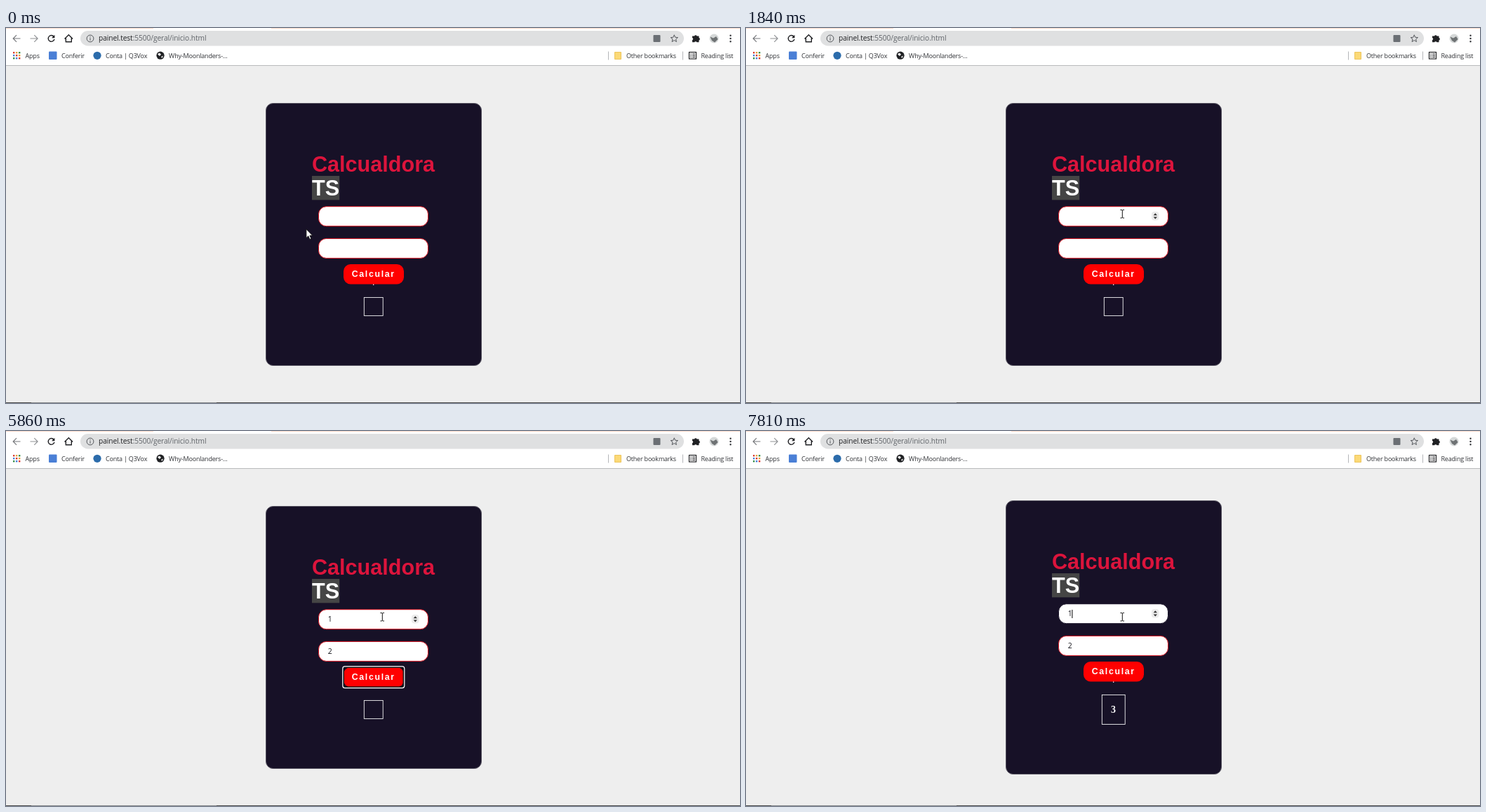
Animation, 1046 px wide and 535 px high, one loop 8 s. Source, as an HTML page:

```html
<!DOCTYPE html>
<html lang="pt">
<head>
<meta charset="utf-8">
<title>Calculadora</title>
<style>
  html, body { margin: 0; width: 100%; height: 100%; overflow: hidden; background: #eee; }
  svg { display: block; width: 1046px; height: 535px; }
  text { white-space: pre; }
  .ui { font-family: "Open Sans", "Noto Sans", sans-serif; fill: #303236; }
  .mark { font-size: 9px; letter-spacing: -.2px; }
  .url { font-size: 10.2px; letter-spacing: -.08px; fill: #5f6368; }
  .field { font-size: 10.4px; fill: #111118; }
  .title { font: bold 30.6px "Liberation Sans", Arial, sans-serif; }
  .calc { font: bold 12.3px "Liberation Sans", Arial, sans-serif; letter-spacing: 1.7px; fill: #fff; }
  .sum { font: bold 14px "Liberation Serif", "Times New Roman", serif; fill: #fff; text-anchor: middle; }
  .line { fill: none; stroke: #202124; stroke-width: 1.4; }
  .thin { stroke: #55585c; stroke-width: 1; }
  .box { fill: #fff; stroke: #d8101c; }
  .box.focus { stroke: #171127; }
</style>
</head>
<body>
<svg viewBox="0 0 1046 535">
  <rect width="1046" height="535" fill="#eee"/>

  <!-- toolbar -->
  <rect width="1046" height="53" fill="#fff"/>
  <path d="M0 .5H210M378 .5H1046" stroke="#fbdccb"/>
  <rect y="53" width="1046" height="1" fill="#b9babb"/>
  <rect x="106" y="4" width="860" height="21.5" rx="10.7" fill="#dfe0e1"/>
  <path class="line" d="M20.5 15H10.5M15 10.2L10.2 15L15 19.8" style="stroke:#77797c;stroke-width:1.2"/>
  <path class="line" d="M34.5 15H45M40.3 10.2L45.1 15L40.3 19.8" style="stroke:#8f9194;stroke-width:1.2"/>
  <path class="line" d="M68.2 12.4A4.4 4.4 0 1 0 68.9 16"/>
  <path d="M69.4 9.8V14.2H65Z" fill="#202124"/>
  <path class="line" d="M83.5 15.4L89.3 9.8L95.1 15.4M85.3 14.2V19.8H93.3V14.2"/>
  <circle class="line thin" cx="120" cy="15" r="4.9"/>
  <path class="line thin" d="M120 14.2V17.8M120 12V13.2"/>
  <text class="ui url" x="132" y="18.4"><tspan fill="#202124">painel.test</tspan>:5500/geral/inicio.html</text>
  <rect x="922.5" y="10" width="10" height="10" rx="1" fill="#6b6f74"/>
  <path class="line thin" id="star"/>
  <path d="M978 11.5H981A1.9 1.9 0 0 1 984.6 11.5H987.5V14A1.8 1.8 0 0 1 987.5 17.5V20.3H984.4A1.7 1.7 0 0 0 981.2 20.3H978V17.3A1.8 1.8 0 0 0 978 13.9Z" fill="#202124"/>
  <circle cx="1009" cy="15" r="6.5" fill="#d5d8d8"/>
  <path d="M1003.5 12.5L1008 14.5L1012 12L1014.5 16L1010 20.5L1006 18Z" fill="#6e7274"/>
  <path d="M1032.5 10.8V19.3" stroke="#303236" stroke-width="2.4" stroke-linecap="round" stroke-dasharray="0 4.2"/>

  <!-- bookmarks -->
  <g id="apps"></g>
  <text class="ui mark" x="27.5" y="42.6">Apps</text>
  <rect x="61" y="33.5" width="11.5" height="11.5" rx="1" fill="#4a7fd6"/>
  <text class="ui mark" x="79" y="42.6">Conferir</text>
  <circle cx="130" cy="39.3" r="5.6" fill="#2c6cab"/>
  <text class="ui mark" x="142" y="42.6">Conta | Q3Vox</text>
  <circle cx="220" cy="39.2" r="5.6" fill="#202124"/>
  <path d="M216 37L219 35.5L221 38L218.5 40ZM221 41L224 39.5L222.5 43Z" fill="#fff"/>
  <text class="ui mark" x="232" y="42.6">Why-Moonlanders-...</text>
  <path d="M858.5 33.5V45.5M964.5 33.5V45.5" stroke="#b4b6b9"/>
  <path d="M867.5 34.5H876.5V44.5H867.5Z" fill="#fbd977" stroke="#edc55e"/>
  <text class="ui mark" x="884" y="42.6">Other bookmarks</text>
  <rect class="line" x="973.5" y="34.5" width="10" height="9.5" style="stroke-width:1.2"/>
  <path class="line" d="M975.3 37H977M978 37H982M975.3 39.3H977M978 39.3H982M975.3 41.6H977M978 41.6H982" style="stroke-width:1"/>
  <text class="ui mark" x="990.5" y="42.6">Reading list</text>

  <!-- calculator -->
  <rect id="card" x="370.5" width="307" rx="10" fill="#171127" stroke="#55525f"/>
  <g id="form">
    <text class="title" x="436" y="205" fill="#dc143c">Calcualdora</text>
    <rect x="436" y="211" width="39.2" height="34.3" fill="#454545"/>
    <text class="title" x="436" y="239" fill="#fff">TS</text>

    <rect class="box" id="boxA" x="445.5" y="254.7" width="156" height="28" rx="11"/>
    <rect class="box" id="boxB" x="445.5" y="300.4" width="156" height="28" rx="11"/>
    <text class="ui field" id="textA" x="458.8" y="272.2"></text>
    <text class="ui field" id="textB" x="458.8" y="317.7"></text>
    <rect id="caret" width="1" height="12"/>
    <g id="spin">
      <rect x="578" y="262" width="10.5" height="12.5" rx="4" fill="#ececec"/>
      <path d="M580.6 267.2L583.3 264.2L586 267.2ZM580.6 269.4L583.3 272.4L586 269.4Z" fill="#333"/>
    </g>

    <rect x="523" y="365" width="1.3" height="2" fill="#e8e8ee"/>
    <rect x="481" y="337" width="86" height="28.5" rx="10" fill="#f00"/>
    <g id="ring" fill="none">
      <rect x="481.2" y="337.3" width="85.2" height="28" rx="4" stroke="#101010" stroke-width="1.6"/>
      <rect x="479.8" y="335.9" width="88" height="30.7" rx="3" stroke="#fff" stroke-width="1.2"/>
    </g>
    <text class="calc" x="492.7" y="355">Calcular</text>
  </g>
  <rect id="sumBox" fill="none" stroke="#fff" stroke-width=".85"/>
  <text class="sum" id="sum" x="523.5" y="402.2"></text>

  <!-- window edge -->
  <rect y="534" width="1046" height="1" fill="#4c4c4c"/>
  <rect x="36" y="534" width="264" height="1" fill="#85878a"/>

  <!-- pointer -->
  <g id="pointer">
    <circle id="click" cx="-1.5" cy="-.5" r="9.5" fill="#ff0" fill-opacity=".47"/>
    <path id="arrow" d="M.4 .5V13L3.3 10.3L5.4 15L7.5 14.1L5.4 9.6H9.2Z" fill="#fff" stroke="#111" stroke-width=".9"/>
    <path id="beam" d="M-2.5 -5.5H-.8L.3 -5L1.4 -5.5H3M.3 -5V5.5M-2.5 6H-.8L.3 5.5L1.4 6H3" fill="none" stroke="#111"/>
  </g>
</svg>

<script>
const LOOP = 8000, BLINK = 500, CLICK = 240, GAP = 67;
const el = id => document.getElementById(id);
const set = (id, attrs) => {
  for (const k in attrs) el(id).setAttribute(k, attrs[k]);
};
const show = (id, on) => set(id, { visibility: on ? 'visible' : 'hidden' });

// What the user does; each action keeps the rest of the state.
const actions = [
  { t: 0, A: '', B: '', sum: '', focus: '' },
  { t: 2040, focus: 'A', click: true },
  { t: 3050, A: '1' },
  { t: 3510, focus: 'B' },
  { t: 4190, B: '1' },
  { t: 5250, B: '' },
  { t: 5450, B: '2' },
  { t: 5860, focus: 'button' },
  { t: 6390, sum: '3' },
  { t: 7530, focus: 'A', click: true }
];

// Pointer glides: cubic curves walked in equal hops.
const home = [427.5, 286.5], left = [252, 302], top1 = [268, 240], gap = [562, 300], rest = [536, 265];
const glides = [
  { t: 70, hops: 1, path: [home, home, left, left] },
  { t: 480, hops: 8, path: [left, [21, 390], [21, 240], top1] },
  { t: 1030, hops: 4, path: [top1, [350, 235], [520, 262], gap] },
  { t: 1570, hops: 5, path: [gap, [556, 280], [541, 268], rest] }
];

const bezier = ([a, b, c, d], u) => a.map((_, i) => {
  const v = 1 - u;
  return v * v * v * a[i] + 3 * v * v * u * b[i] + 3 * v * u * u * c[i] + u * u * u * d[i];
});

function pointerAt(t) {
  const g = glides.filter(g => g.t <= t).pop();
  if (!g) return home;
  const hop = Math.min(g.hops, 1 + Math.floor((t - g.t) / GAP));
  return bezier(g.path, hop / g.hops);
}

function draw(t) {
  const past = actions.filter(a => a.t <= t);
  const last = past[past.length - 1];
  const s = Object.assign({}, ...past);
  const age = t - last.t;

  const [x, y] = pointerAt(t);
  const over = x > 446 && x < 601 && y > 255 && y < 282;
  set('pointer', { transform: `translate(${x} ${y})` });
  show('arrow', !over);
  show('beam', over);
  show('spin', over);
  show('click', last.click && age < CLICK);
  show('ring', s.focus === 'button');

  for (const f of ['A', 'B']) {
    el('box' + f).classList.toggle('focus', s.focus === f);
    el('text' + f).textContent = s[f];
  }
  show('caret', s.focus in { A: 1, B: 1 } && Math.floor(age / BLINK) % 2 === 0);
  set('caret', { x: s[s.focus] ? 464.4 : 459, y: s.focus === 'B' ? 308.5 : 263 });

  // The answer makes the card grow by 8 px both ways.
  const grow = s.sum ? 8 : 0, wide = s.sum ? 3 : 0;
  set('card', { y: 107.5 - grow, height: 374 + 2 * grow });
  set('form', { transform: `translate(0 ${-grow})` });
  set('sumBox', { x: 510.3 - wide, y: 384.4 - grow, width: 26.9 + 2 * wide, height: 26 + 2 * grow });
  el('sum').textContent = s.sum;
}

const hues = ['#d93f33', '#e8a33d', '#3a8f4c', '#4a7fd6'];
el('apps').innerHTML = Array.from({ length: 9 }, (_, i) =>
  `<rect x="${10 + i % 3 * 4}" y="${34 + Math.floor(i / 3) * 4}" width="2.4" height="2.4" fill="${hues[i % 4]}"/>`).join('');

const tips = Array.from({ length: 10 }, (_, i) => {
  const r = i % 2 ? 2.4 : 5.4, a = i * Math.PI / 5;
  return `${(952.3 + r * Math.sin(a)).toFixed(2)} ${(15.2 - r * Math.cos(a)).toFixed(2)}`;
});
set('star', { d: `M${tips.join('L')}Z` });

const start = performance.now();
function tick() {
  draw((performance.now() - start) % LOOP);
  requestAnimationFrame(tick);
}
tick();
</script>
</body>
</html>
```
